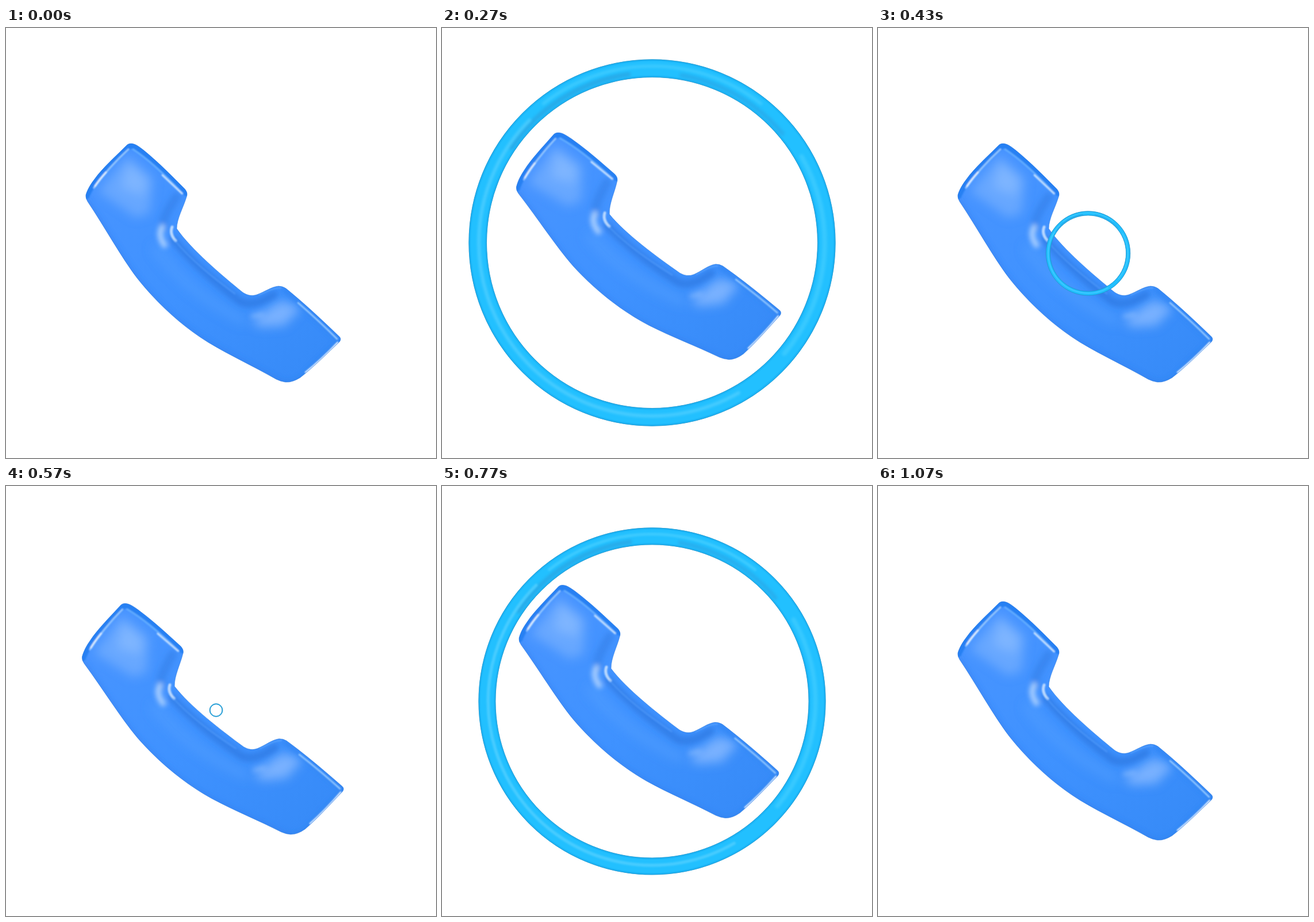
An HTML page that plays this animation: 748 by 748 pixels, repeating every 1100 ms.

```html
<!DOCTYPE html>
<html lang="en">
<head>
<meta charset="utf-8">
<title>Ringing phone</title>
<style>
  html, body { margin: 0; width: 100%; height: 100%; overflow: hidden; background: #fff; }
  svg { display: block; width: 100%; height: 100%; }
  .line { fill: none; stroke-linecap: round; stroke-linejoin: round; }
  .edge { fill: none; stroke: #2690c4; stroke-width: .8; vector-effect: non-scaling-stroke; }
</style>
</head>
<body>
<svg viewBox="0 0 748 748">
  <defs>
    <path id="body" d="M217 201C225 201 231 206 240 213C267 235 291 260 311 280C315 285 316 289 314 294C309 311 297 332 297 349C322 385 375 430 412 460Q424 468 436 464C450 459 462 450 474 449Q481 449 487 453C519 479 551 509 580 537Q584 541 580 546C559 566 535 590 512 608Q498 617 486 616Q478 615 470 611C430 588 390 570 352 547C305 518 262 478 228 435C200 398 172 347 142 302Q138 296 139 290C143 277 150 268 160 255C176 236 194 220 211 203Q214 201 217 201Z"/>
    <clipPath id="inside"><use href="#body"/></clipPath>
    <linearGradient id="blue" gradientUnits="userSpaceOnUse" x1="170" y1="230" x2="520" y2="600">
      <stop offset="0" stop-color="#4894ff"/>
      <stop offset=".5" stop-color="#3f92ff"/>
      <stop offset="1" stop-color="#378bf8"/>
    </linearGradient>
    <filter id="b1" x="-50%" y="-50%" width="200%" height="200%"><feGaussianBlur stdDeviation="1.2"/></filter>
    <filter id="b4" x="-50%" y="-50%" width="200%" height="200%"><feGaussianBlur stdDeviation="4"/></filter>
    <filter id="b9" x="-60%" y="-60%" width="220%" height="220%"><feGaussianBlur stdDeviation="9"/></filter>
  </defs>

  <g id="phone">
    <use href="#body" fill="url(#blue)"/>
    <g clip-path="url(#inside)">
      <g filter="url(#b9)">
        <path d="M212 222L256 262L250 322L226 330L160 284Z" fill="#75b0ff" opacity=".7"/>
        <path d="M212 234L246 262L240 292L200 278Z" fill="#8cbfff" opacity=".6"/>
        <path d="M428 508L478 474L514 486L484 518L440 520Z" fill="#84b8ff" opacity=".85"/>
        <path class="line" d="M262 385C300 438 350 476 410 508" stroke="#529eff" stroke-width="16" opacity=".6"/>
      </g>
      <g class="line" filter="url(#b4)">
        <path d="M296 294C280 320 272 332 274 346" stroke="#3480ea" stroke-width="16" opacity=".6"/>
        <path d="M291 368C324 408 368 446 408 476Q430 486 466 464" stroke="#2f7be4" stroke-width="13" opacity=".8"/>
        <path d="M141 300C172 347 200 398 228 435C262 478 305 518 352 547C390 570 430 588 480 616" stroke="#2f7cee" stroke-width="5" opacity=".65"/>
        <path d="M478 616Q498 620 516 608L584 542" stroke="#2d7cea" stroke-width="7" opacity=".5"/>
        <path d="M486 455L580 540" stroke="#2f84f2" stroke-width="10" opacity=".7"/>
        <path d="M428 501L446 498" stroke="#a5ccff" stroke-width="5" opacity=".6"/>
        <path d="M272 346Q263 360 276 378" stroke="#c4deff" stroke-width="9" opacity=".85"/>
      </g>
      <g class="line" filter="url(#b1)">
        <path d="M140 292C150 266 180 236 217 203C245 216 280 247 314 287" stroke="#2580f3" stroke-width="11"/>
        <path d="M153 278C168 257 190 232 213 211" stroke="#98caff" stroke-width="3"/>
        <path d="M155 275C160 267 166 260 174 251" stroke="#e4f2ff" stroke-width="3"/>
        <path d="M221 211C250 230 278 257 307 288" stroke="#62adff" stroke-width="3"/>
        <path d="M272 256L306 288" stroke="#c6e1ff" stroke-width="3"/>
        <path d="M289 346Q284 358 295 370" stroke="#cfe5ff" stroke-width="5" opacity=".85"/>
        <path d="M294 370C322 404 360 434 398 462" stroke="#5aa2ff" stroke-width="3" opacity=".45"/>
        <path d="M440 464C454 458 466 452 478 452" stroke="#62a9ff" stroke-width="2.5" opacity=".6"/>
        <path d="M508 478C530 497 554 519 576 541" stroke="#9accff" stroke-width="2.6"/>
        <path d="M577 547C560 565 540 584 521 599" stroke="#eef6ff" stroke-width="2.6"/>
      </g>
    </g>
    <use href="#body" fill="none" stroke="#2874d8" stroke-width=".8" opacity=".6"/>
  </g>

  <g id="ring"></g>
</svg>
<script>
const phone = document.getElementById('phone');
const ring = document.getElementById('ring');

const arc = (r, from, to, color, width, blur, opacity) => {
  const at = deg => {
    const a = deg * Math.PI / 180;
    return `${r * Math.cos(a)} ${r * Math.sin(a)}`;
  };
  const large = to - from > 180 ? 1 : 0;
  return `<path class="line" d="M${at(from)}A${r} ${r} 0 ${large} 1 ${at(to)}" stroke="${color}"
    stroke-width="${width}" opacity="${opacity}" style="filter:blur(${blur}px)"/>`;
};
const circle = (r, attrs) => `<circle r="${r}" ${attrs}/>`;

// Torus with an outer radius of 100 units
ring.innerHTML =
  circle(95, 'class="line" stroke="#22c0ff" stroke-width="9.8"') +
  circle(99.3, 'class="line" stroke="#1cb6f8" stroke-width="1"') +
  circle(90.7, 'class="line" stroke="#1cb6f8" stroke-width="1"') +
  arc(92.6, -146, -98, '#2aa4e2', 2.6, .9, .75) +
  arc(92.6, -80, -40, '#2aa6e6', 2.4, .9, .65) +
  arc(96.2, -128, -52, '#46ceff', 1.8, .6, .7) +
  arc(94.4, 60, 225, '#58d1ff', 1.8, .6, .7) +
  arc(94, -30, 40, '#42cdff', 2.6, .7, .7) +
  circle(99.8, 'class="edge"') +
  circle(90.2, 'class="edge"');

const LOOP = 1100, FRAME = 100 / 3, PULSE = 16;
const TILT = [[0, 0], [3, -8.3], [6, 0], [10, -8.3], [13, 0], [16, 0]];
const LIFT = [[0, 0], [1, -4], [7, -34], [8, -30.2], [13, 0], [16, 0]];

function sample(keys, x) {
  const i = Math.max(1, keys.findIndex(k => k[0] >= x));
  const [x0, y0] = keys[i - 1], [x1, y1] = keys[i];
  return y0 + (y1 - y0) * (x - x0) / (x1 - x0);
}

const ease = x => (1 - Math.cos(Math.PI * Math.min(1, Math.max(0, x)))) / 2;
const radius = k => 320 * ease(k / 8.25) * (1 - ease((k - 8.6) / 6.45));

function draw(ms) {
  const t = Math.floor((ms % LOOP) / 10) * 10;
  const k = Math.floor((t + 5) / FRAME) % PULSE;
  phone.setAttribute('transform',
    `translate(0 ${sample(LIFT, k)}) rotate(${sample(TILT, k)} 366 430)`);

  const r = radius(k);
  const y = k <= 8 ? 390.6 - .0535 * r : 397.4 - .0735 * r;
  ring.setAttribute('visibility', r > 1 ? 'visible' : 'hidden');
  ring.setAttribute('transform', `translate(365.5 ${y}) scale(${Math.max(r, 1) / 100})`);
}

const start = performance.now();
function tick(now) {
  draw(Math.max(0, now - start));
  requestAnimationFrame(tick);
}
draw(0);
requestAnimationFrame(tick);
</script>
</body>
</html>
```
